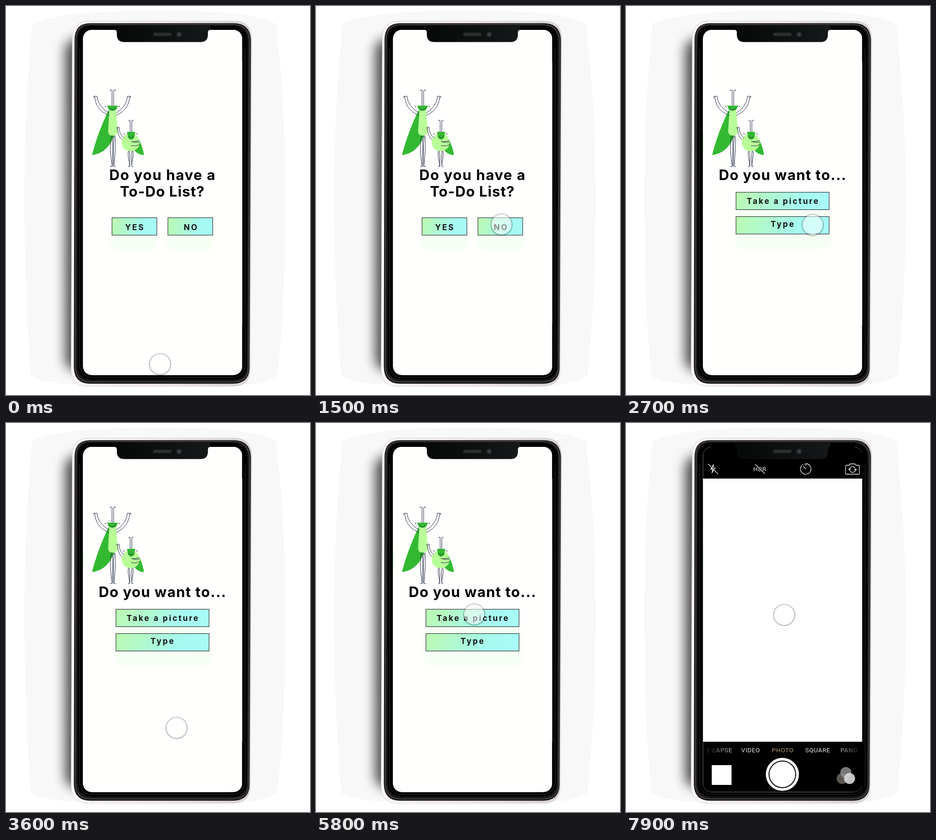
Animation, 661 px wide and 847 px high, one loop 8000 ms. Source, as an HTML page:

```html
<!DOCTYPE html>
<html lang="en">
<head>
<meta charset="utf-8">
<title>To-Do List app</title>
<style>
  html, body { margin: 0; width: 100%; height: 100%; overflow: hidden; background: #fff; }
  svg { display: block; width: 661px; height: 847px; }
  text { text-anchor: middle; }
  .title { font: 700 31px Inter, "Open Sans", sans-serif; }
  .label { font: 700 17px Inter, "Open Sans", sans-serif; letter-spacing: 3px; fill: #101010; }
  .mode { font: 400 13.5px Roboto, Inter, sans-serif; letter-spacing: .6px; fill: #e4e4e4; }
  .ink { fill: none; stroke: #1d2440; stroke-width: 1; stroke-linecap: round; stroke-linejoin: round; }
  .icon { fill: none; stroke: #f2f2f2; stroke-width: 1.3; stroke-linecap: round; stroke-linejoin: round; }
  .button { fill: url(#mint); stroke: #222; stroke-width: 1.1; }
  .dark { fill: #33b931; }
  .light { fill: #b9ff98; }
</style>
</head>
<body>
<svg viewBox="0 0 661 847" xmlns="http://www.w3.org/2000/svg">
  <defs>
    <linearGradient id="mint" x1="0" y1="0" x2="1" y2=".12">
      <stop offset="0" stop-color="#bdfbb0"/>
      <stop offset=".45" stop-color="#adf8d6"/>
      <stop offset=".75" stop-color="#a5faf1"/>
      <stop offset="1" stop-color="#a8fbf6"/>
    </linearGradient>
    <linearGradient id="rim" x1="0" x2="1">
      <stop offset="0" stop-color="#fdf8fa"/>
      <stop offset=".5" stop-color="#f1e9ec"/>
      <stop offset="1" stop-color="#d8d2d2"/>
    </linearGradient>
    <linearGradient id="notch" x1="0" x2="1">
      <stop offset="0" stop-color="#060808"/>
      <stop offset=".5" stop-color="#0d1010"/>
      <stop offset="1" stop-color="#161919"/>
    </linearGradient>
    <linearGradient id="fadeIn" x1="0" x2="1">
      <stop offset="0" stop-color="#222"/>
      <stop offset="1" stop-color="#d8d8d8"/>
    </linearGradient>
    <linearGradient id="fadeOut" x1="0" x2="1">
      <stop offset="0" stop-color="#b5b5b5"/>
      <stop offset="1" stop-color="#333"/>
    </linearGradient>
    <radialGradient id="halo">
      <stop offset=".86" stop-color="#000" stop-opacity="0"/>
      <stop offset=".9" stop-color="#000" stop-opacity=".34"/>
      <stop offset="1" stop-color="#000" stop-opacity="0"/>
    </radialGradient>
    <filter id="soft" x="-60%" y="-10%" width="220%" height="120%"><feGaussianBlur stdDeviation="13"/></filter>
    <filter id="glow" x="-20%" y="-60%" width="140%" height="220%"><feGaussianBlur stdDeviation="5"/></filter>
    <clipPath id="screen"><rect x="167.5" y="52" width="346" height="751.5" rx="19"/></clipPath>

    <g id="bugs">
      <path class="dark" d="M223 227C208 258 195 292 187 324.500C209 322 226 308 236 280V230Z"/>
      <path class="light" d="M225 222H239L243 272Q243 282 233 282H231Q222 282 222 272Z"/>
      <path class="dark" d="M219.500 217H244L239 226Q231.500 230 224 226Z"/>
      <path class="ink" d="M224 221.500Q231.500 231.500 239 221.500
        M230.500 217V184Q230 182 226.500 183V185 M234 217V184Q234.500 182 238 183V185
        M191 200V196.500H198Q199 218 224 233 M193 198C195 219 206 231 224 238
        M271 200V196.500H264Q263 218 240 233 M269 198C267 219 256 231 240 238
        M229 283C225 305 227 322 231 349L226.500 350 M231 283C233 305 232 322 231 349
        M235 283C233 305 233.500 322 234 349 M237 283C239 305 237 322 234.500 349L238.500 350"/>
      <circle cx="216.500" cy="218.500" r="1"/><circle cx="246.500" cy="218.500" r="1"/>
      <path class="dark" d="M287 288C294 299 298 311 300 324.500C291 324 285 321 279 314Z"/>
      <circle class="light" cx="271" cy="297" r="19.500"/>
      <path class="dark" d="M263 274H281L278.500 287Q272 295 265.500 287Z"/>
      <path class="ink" d="M266 283Q272 292 278 283
        M270 274V250Q269.500 247.500 267 249V250 M273.500 274V250Q274 247.500 276.500 249V250
        M241 267V264H246Q246 279 256 287 M242.500 266Q243 284 252 291
        M272 295Q282 296 290 293 M290 296Q287 298 275 296 M272 304Q282 306 290 302
        M266 316C264 327 268 334 269 349L265.500 350 M268 316C270 327 269 337 269 349
        M274 316C272 327 273 337 273.500 349 M276 316C278 327 274 334 273.500 349L276.500 350"/>
      <circle cx="256.500" cy="278.500" r="1"/><circle cx="284.500" cy="278.500" r="1"/>
    </g>
  </defs>

  <rect width="661" height="847" fill="#fff"/>
  <path fill="#f8f8f8" d="M57 39C95 20 190 10 330 10S550 18 588 40C602 180 608 290 608 420S603 690 590 805C572 815 555 820 530 824H140C105 821 75 817 55 806C45 700 40 560 40 420S45 170 57 39Z"/>
  <rect x="129" y="72" width="80" height="722" rx="25" fill="#000" opacity=".7" filter="url(#soft)"/>

  <path fill="url(#rim)" stroke="#c9c4c6" stroke-width=".8" d="M180 33H497Q533 33 534 70L531 790Q531 828 493 828H179Q142 828 141.500 790L144 70Q145 33 180 33Z"/>
  <path fill="#1b1a1a" d="M182 37.500H495Q531 38 532.500 74L529.500 788Q529 822 493 822.500H182Q148 822 147.500 786L149 74Q149 38 182 37.500Z"/>
  <path fill="none" stroke="#625a58" stroke-width="1.200" d="M182 40.500H494Q527 41 529.500 74L527 788Q526 818 492 818.500H183Q152 818 151 786L152 74Q152 41 182 40.500Z"/>
  <path fill="#000" d="M184 42.500H492Q524 43 525.500 76L524 784Q523 813 491 813.500H186Q157 813 155.500 784L156 76Q156 43 184 42.500Z"/>
  <path fill="none" stroke="#343131" stroke-width="1" d="M160 90V780Q161 809 188 809H490Q519 809 520 780V90"/>

  <g clip-path="url(#screen)">
    <g id="ask">
      <rect x="167" y="52" width="347" height="752" fill="#fffffe"/>
      <rect x="167" y="52" width="380" height="752" fill="#fffffe"/>
      <g fill="#f5fff3" filter="url(#glow)">
        <rect x="228" y="490" width="102" height="42" rx="18"/>
        <rect x="350" y="490" width="102" height="42" rx="18"/>
      </g>
      <use href="#bugs"/>
      <text class="title" x="340.500" y="378.500" letter-spacing="1.600">Do you have a</text>
      <text class="title" x="340" y="415" letter-spacing="1.100">To-Do List?</text>
      <rect class="button" x="230.500" y="461" width="97.500" height="38"/>
      <rect class="button" x="352" y="461" width="97.500" height="38"/>
      <text class="label" x="280.500" y="488">YES</text>
      <text class="label" x="402.500" y="488">NO</text>
    </g>
    <g id="choose">
      <rect x="167" y="52" width="380" height="752" fill="#fffffe"/>
      <rect x="236" y="440" width="210" height="88" rx="20" fill="#f5fff3" filter="url(#glow)"/>
      <use href="#bugs"/>
      <text class="title" x="340.500" y="378.500" letter-spacing="1.300">Do you want to...</text>
      <rect class="button" x="239" y="405.500" width="202.500" height="38"/>
      <rect class="button" x="239" y="458.500" width="202.500" height="38"/>
      <text class="label" x="341.500" y="431">Take a picture</text>
      <text class="label" x="341" y="480.500">Type</text>
    </g>
    <g id="camera">
      <rect x="167" y="52" width="347" height="752" fill="#000"/>
      <rect x="167" y="121" width="347" height="573" fill="#fff"/>
      <path fill="#f2f2f2" d="M191 88L183 101H188L186 111L195 97.500H190Z"/>
      <path stroke="#000" stroke-width="3" d="M179 89L200 110"/>
      <path class="icon" d="M179 89.500L199.500 110.500"/>
      <text class="mode" x="291" y="105">HDR</text>
      <path stroke="#000" stroke-width="3" d="M281 90L302 110"/>
      <path class="icon" d="M281 90L301.500 110"/>
      <path class="icon" d="M391 92V88.500A11.500 11.500 0 1 1 382 92.500 M385.500 94.500L391 100"/>
      <path class="icon" stroke-dasharray="1 2.500" d="M384 91L391 88.500"/>
      <path class="icon" d="M479.500 92H485L487.500 89H497.500L500 92H505.500Q507.500 92 507.500 94V109.500Q507.500 111.500 505.500 111.500H479.500Q477.500 111.500 477.500 109.500V94Q477.500 92 479.500 92Z
        M486 101A6.500 6.500 0 0 1 498 98 M499 101A6.500 6.500 0 0 1 487 104.500
        M484 100L486 102.500L488.500 100 M496.500 102.500L499 100L501 102.500"/>
      <text class="mode" x="203" y="717" style="fill:url(#fadeIn)">E-LAPSE</text>
      <text class="mode" x="271" y="717">VIDEO</text>
      <text class="mode" x="341" y="717" style="fill:#b79b73">PHOTO</text>
      <text class="mode" x="417" y="717">SQUARE</text>
      <text class="mode" x="485" y="717" style="fill:url(#fadeOut)">PANO</text>
      <rect x="186.500" y="745" width="43" height="43" fill="#fff"/>
      <circle cx="340" cy="765" r="36" fill="#fff"/>
      <circle cx="340" cy="765" r="29" fill="#fff" stroke="#000" stroke-width="2"/>
      <circle cx="470" cy="774" r="12" fill="#5b5652"/>
      <circle cx="478" cy="761" r="12" fill="#8d8d8d" fill-opacity=".85"/>
      <circle cx="486" cy="774" r="12" fill="#dadada" fill-opacity=".9"/>
    </g>
  </g>

  <path fill="url(#notch)" d="M236 43H444V52Q439 52 439 58V62Q439 78.500 423 78.500H257Q241 78.500 241 62V58Q241 52 236 52Z"/>
  <rect x="320" y="58" width="40" height="7.500" rx="3.700" fill="#2d2d2d"/>
  <circle cx="376.500" cy="62" r="6" fill="#2b2c2d"/>
  <circle cx="376.500" cy="62" r="2.500" fill="#454849"/>

  <g id="touch">
    <circle cy="1" r="25" fill="url(#halo)"/>
    <circle r="22" fill="#fff" fill-opacity=".52"/>
  </g>
</svg>
<script>
  const LOOP = 8000, STEP = 100, WIDTH = 346;
  const el = id => document.getElementById(id);
  const [ask, choose, camera, touch] = ["ask", "choose", "camera", "touch"].map(el);

  // time, x, y
  const path = [
    [0, 335, 779], [200, 335, 779], [1250, 403, 475], [2400, 406, 475],
    [2750, 406, 476], [3500, 371, 663], [4200, 371, 663], [5300, 344, 416],
    [5800, 344, 416], [7100, 344, 417], [LOOP, 344, 417]
  ];

  const ease = p => p < .5 ? 2 * p * p : 1 - 2 * (1 - p) ** 2;
  const span = (t, start, length) => ease(Math.min(1, Math.max(0, (t - start) / length)));
  const move = (node, x, y = 0) => node.setAttribute("transform", `translate(${x.toFixed(2)} ${y.toFixed(2)})`);

  function touchAt(t) {
    const i = path.findIndex(k => k[0] > t);
    const [t0, x0, y0] = path[i - 1], [t1, x1, y1] = path[i];
    const p = span(t, t0, t1 - t0);
    return [x0 + (x1 - x0) * p, y0 + (y1 - y0) * p];
  }

  function draw(t) {
    const first = span(t, 2258, 450);
    const second = span(t, 7060, 450);
    move(ask, -WIDTH * .1 * first);
    move(choose, WIDTH * (1 - first) - WIDTH * .1 * second);
    move(camera, WIDTH * (1 - second));
    move(touch, ...touchAt(t));
  }

  const begin = performance.now();
  function tick() {
    const t = (performance.now() - begin) % LOOP;
    draw(Math.floor(t / STEP) * STEP);
    requestAnimationFrame(tick);
  }
  draw(0);
  requestAnimationFrame(tick);
</script>
</body>
</html>
```
